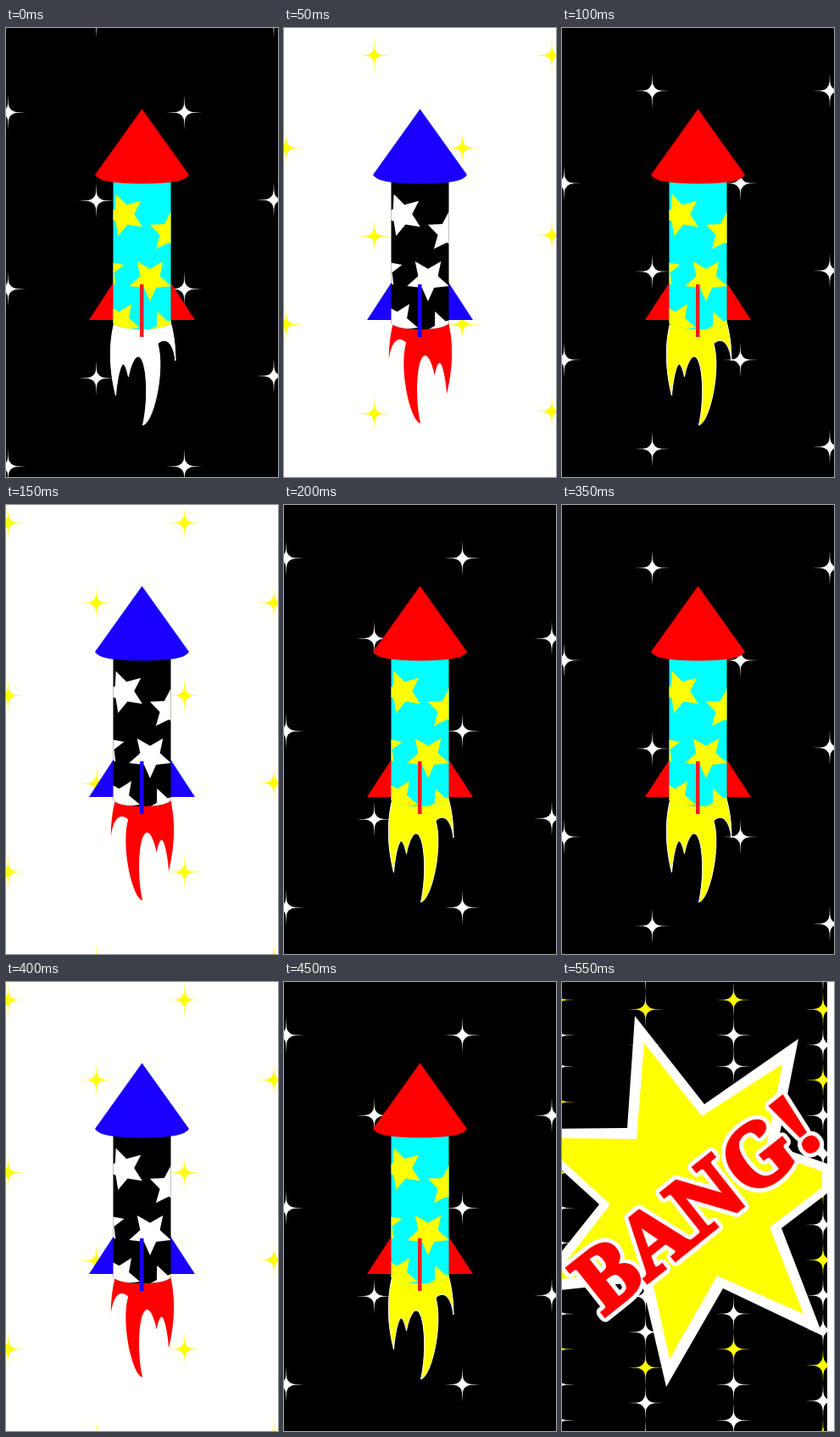
Write an HTML page with a canvas that moves like this. It is 321 px wide and 529 px high and loops after 600 ms.

```html
<!DOCTYPE html>
<html lang="en">
<head>
<meta charset="utf-8">
<title>Rocket</title>
<style>
html, body { margin: 0; width: 100%; height: 100%; overflow: hidden; background: #000; }
canvas { display: block; }
</style>
</head>
<body>
<canvas id="stage" width="321" height="529"></canvas>
<script>
const W = 321, H = 529, STEP = 50, STEPS = 12, FALL = 41.7;
const ctx = document.getElementById('stage').getContext('2d');

const DARK = { sky: '#000', twinkle: '#fff', trim: '#f00', body: '#0ff', spots: '#ff0', bar: '#ed1c24' };
const LIGHT = { sky: '#fffffd', twinkle: '#ff0', trim: '#1900ff', body: '#000', spots: '#fffffd', bar: '#1900ff' };

// Sky columns: x and the heights of their stars at phase 0
const COLUMNS = [
  [2.5, [-104, 99.5, 307.5, 516.5]],
  [106.5, [-9.5, 203.5, 412.5]],
  [210.5, [-104, 99.5, 307.5, 516.5]],
  [316, [-9.5, 202.5, 410]]
];

// Body spots: centre x, centre y, radius, angle of one tip
const SPOTS = [
  [139, 220, 26, -39], [193, 241, 25, 130], [118, 284, 22, -13],
  [170, 296, 26, 90], [134, 346, 25, -56], [188, 357, 25, -113]
];

const spikes = new Path2D('M0-21L.7 0L0 21L-.7 0ZM-21 0L0-.7L21 0L0 .7Z');
const core = new Path2D('M0-11Q1.2-1.2 11 0Q1.2 1.2 0 11Q-1.2 1.2-11 0Q-1.2-1.2 0-11Z');
const nose = new Path2D('M160.5 95.5L216 173Q211 183.500 160.5 183.500Q110 183.500 105 173Z');
const body = new Path2D('M126.5 178H194.5V348Q188 355 160.5 355Q133 355 126.5 348Z');
const fins = new Path2D('M127 299.5L98 344H127ZM194 299.5L223 344H194Z');
const flame = new Path2D('M128 346C122 370 121 398 129.500 433C131 414 135 396 138.500 396C141 397 143 404 144.500 411' +
  'C147 397 152 387 156 387C166 388 169 435 161.500 468C174 465 188 404 179 372C187 364 197 368 200 392C200 372 197 356 194 346Z');
const burstEdge = new Path2D('M86 40L168 144L279 67L254 194L313 214V249L259 290L308 417L190 361L123 477L94 353L-12 364L-12 332L44 262L-12 211L-12 173L77 172Z');
const burst = new Path2D('M97 72L165 158L260 97L240 200L307 223V242L245 289L285 391L183 346L127 444L104 340L-12 351L57 262L-12 199V184L88 185Z');

function fill(path, color) {
  ctx.fillStyle = color;
  ctx.fill(path);
}

function drawSky(phase, color) {
  for (const [x, rows] of COLUMNS) {
    for (const y of rows) {
      ctx.save();
      ctx.translate(x, y + phase * FALL);
      fill(spikes, color);
      fill(core, color);
      ctx.restore();
    }
  }
}

function spot(x, y, r, tip) {
  const path = new Path2D();
  for (let i = 0; i < 10; i++) {
    const a = (tip + i * 36) * Math.PI / 180, d = i % 2 ? r * 0.47 : r;
    path.lineTo(x + d * Math.cos(a), y + d * Math.sin(a));
  }
  return path;
}

function drawFlame(phase) {
  ctx.save();
  if (phase % 2) {
    ctx.transform(-0.97, 0, 0, 0.99, 317.8, 2.5);
    fill(flame, '#f00');
  } else {
    fill(flame, phase ? '#ff0' : '#fff');
    ctx.strokeStyle = '#fff';
    ctx.lineWidth = 1;
    ctx.stroke(flame);
  }
  ctx.restore();
}

function drawRocket(phase) {
  const c = phase % 2 ? LIGHT : DARK;
  ctx.fillStyle = c.sky;
  ctx.fillRect(0, 0, W, H);
  drawSky(phase, c.twinkle);
  drawFlame(phase);
  fill(fins, c.trim);
  fill(body, c.body);
  ctx.save();
  ctx.clip(body);
  for (const s of SPOTS) fill(spot(...s), c.spots);
  ctx.restore();
  fill(nose, c.trim);
  ctx.fillStyle = c.bar;
  ctx.fillRect(158, 302, 4.5, 62);
}

function drawWord() {
  ctx.save();
  ctx.translate(181, 290);
  ctx.rotate(-38.5 * Math.PI / 180);
  ctx.font = '900 101px "Noto Serif", serif';
  ctx.textAlign = 'center';
  ctx.lineJoin = 'round';
  ctx.lineWidth = 14;
  ctx.strokeStyle = '#fff';
  ctx.strokeText('BANG!', 0, 0);
  ctx.lineJoin = 'miter';
  ctx.miterLimit = 3;
  ctx.lineWidth = 4;
  ctx.strokeStyle = ctx.fillStyle = '#f00';
  ctx.strokeText('BANG!', 0, 0);
  ctx.fillText('BANG!', 0, 0);
  ctx.restore();
}

// The whole scene jolts sideways by dx
function drawBang(dx) {
  ctx.fillStyle = '#fff';
  ctx.fillRect(0, 0, W, H);
  ctx.save();
  ctx.translate(dx, 0);
  ctx.fillStyle = '#000';
  ctx.fillRect(0, 0, W, H);
  for (let p = 0; p < 5; p++) drawSky(p, p % 2 ? '#ff0' : '#fff');
  ctx.translate(8, 0);
  fill(burstEdge, '#fff');
  fill(burst, '#ff0');
  drawWord();
  ctx.restore();
  if (dx < 0) {
    ctx.fillStyle = '#fff';
    ctx.fillRect(W + dx, 0, -dx, H);
  }
}

let shown = -1;
function tick() {
  const step = Math.floor(performance.now() / STEP) % STEPS;
  if (step !== shown) {
    shown = step;
    if (step < 10) drawRocket(step % 5);
    else drawBang(step === 10 ? 0 : -8);
  }
  requestAnimationFrame(tick);
}
tick();
</script>
</body>
</html>
```
